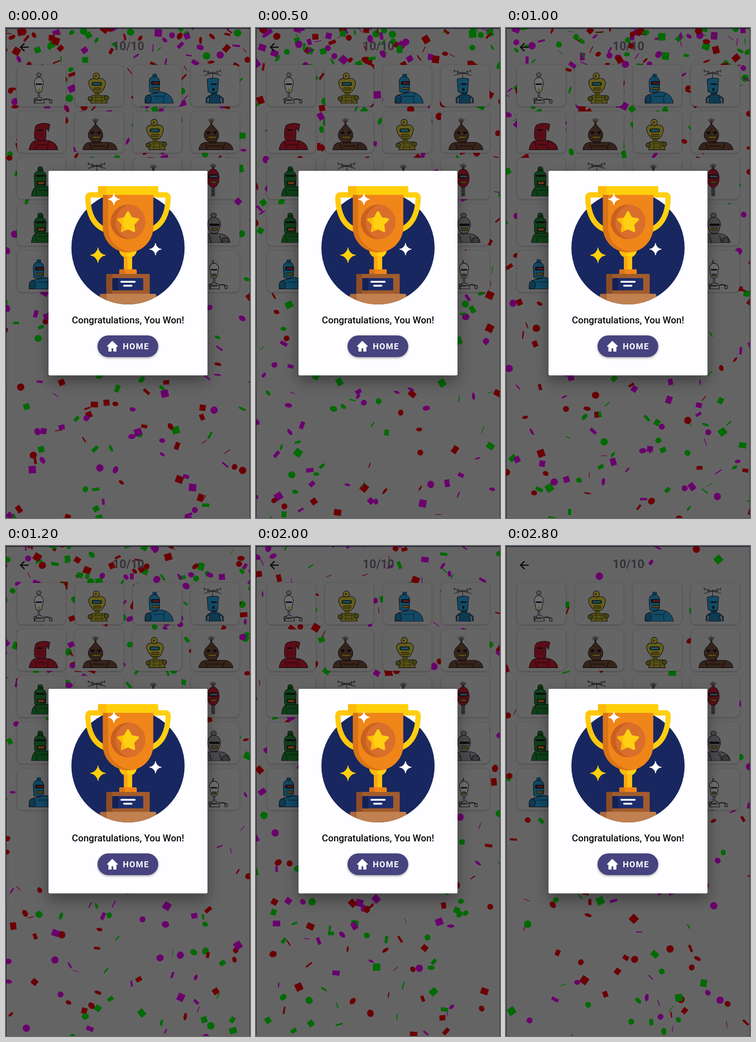
These frames come from a looping animation (528 by 1060 pixels, 2900 ms). An HTML page with a canvas:

```html
<!DOCTYPE html>
<html lang="en">
<head>
<meta charset="utf-8">
<title>Congratulations</title>
<style>
html, body { margin: 0; width: 100%; height: 100%; overflow: hidden; background: #656465; }
canvas, svg { position: absolute; left: 0; top: 0; width: 528px; height: 1060px; }
text { font-family: Roboto, "Open Sans", sans-serif; text-anchor: middle; }
</style>
</head>
<body>
<canvas id="stage" width="528" height="1060"></canvas>
<svg viewBox="0 0 528 1060">
  <text x="265" y="48" font-size="25.6" font-weight="700" fill="#353338">10/10</text>
  <text x="264" y="639" font-size="20.55" font-weight="500" fill="#0a0a0c">Congratulations, You Won!</text>
  <text x="281.5" y="695" font-size="18" font-weight="600" letter-spacing="1.6" fill="#fff">HOME</text>
</svg>
<script>
const W = 528, H = 1060, LOOP = 2900, STEP = 100;
const main = document.getElementById('stage').getContext('2d');
let c;

function layer(draw) {
  const cv = document.createElement('canvas');
  cv.width = W;
  cv.height = H;
  c = cv.getContext('2d');
  draw();
  return cv;
}

function rect(x, y, w, h, r, fill) {
  c.beginPath();
  c.roundRect(x, y, w, h, r);
  c.fillStyle = fill;
  c.fill();
}

function disc(x, y, rx, ry, fill, line) {
  c.beginPath();
  c.ellipse(x, y, rx, ry, 0, 0, 7);
  c.fillStyle = fill;
  c.fill();
  if (line) outline();
}

function outline(path) {
  c.strokeStyle = '#0d0d0f';
  c.lineWidth = 1.1;
  path ? c.stroke(path) : c.stroke();
}

function shape(d, fill, line) {
  const p = new Path2D(d);
  c.fillStyle = fill;
  c.fill(p);
  if (line) outline(p);
}

function stroke(d, color, width) {
  c.strokeStyle = color;
  c.lineWidth = width;
  c.stroke(new Path2D(d));
}

function shadow(color, blur, dy) {
  c.shadowColor = color;
  c.shadowBlur = blur;
  c.shadowOffsetY = dy;
}

// ---- robots, in card coordinates (105 x 89) ----
const INK = '#0d0d0f', GOLD = '#6b5714';

function grin(x, y, w = 13) {
  rect(x - w / 2, y - 3, w, 6, 2, INK);
  rect(x - w / 2 + 1, y - 2, w - 2, 4, 1, GOLD);
  for (let i = -1; i < 2; i++) rect(x + i * w / 4 - .4, y - 2, .8, 4, 0, INK);
}

function tuft(x, y) {
  for (let i = -2; i < 3; i++) stroke(`M${x} ${y}L${x + i * 3.4} ${y - 13 + Math.abs(i) * 1.5}`, '#2a2422', 1.5);
}

function antenna(x, y) {
  stroke(`M${x} ${y + 16}V${y - 3}M${x - 20} ${y - 5}L${x + 19} ${y + 6}M${x - 19} ${y + 6}L${x + 18} ${y - 5}
    M${x - 18} ${y - 7}v6M${x - 10} ${y - 5}v7M${x + 10} ${y - 5}v7M${x + 17} ${y - 7}v6M${x - 13} ${y + 1}h26`, '#19191c', 1.2);
}

function white(cone) {
  const col = '#6e6e71', dx = cone ? 3 : 0;
  c.translate(dx, 0);
  shape('M37 83Q38 70 48 70T59 83Z', '#626265', 1);
  disc(39, 75, 3, 3, '#4c4c4f', 1);
  disc(73, 79, 3, 4, '#5a5a5d', 1);
  stroke('M58 75Q67 72 72 76M38 79V83M43 76H54', INK, 2);
  rect(44, 58, 6, 13, 1, '#444447');
  if (cone) shape('M41 34L45 21L48 34Z', col, 1);
  else {
    rect(42, 24, 10, 6, 1, '#58585b');
    disc(47, 21, 5, 4, '#58585b', 1);
  }
  shape('M37 38Q38 28 47 27Q56 28 57 38L53 57Q47 62 41 57Z', col, 1);
  rect(40, 40, 14, 3, 1, INK);
  if (cone) grin(47, 53, 10);
  else rect(45, 51, 5, 6, 2, GOLD);
}

function yellow() {
  const col = '#645e1c', dim = '#484313';
  shape('M34 83L36 66H66L70 83Z', '#585218', 1);
  disc(33, 73, 5, 5, dim, 1);
  disc(68, 71, 5, 5, dim, 1);
  stroke('M41 70H61M42 77H62M45 66V83M58 66V83', '#33300c', 1.3);
  rect(42, 57, 12, 9, 1, dim);
  disc(46, 24, 7, 7, col, 1);
  disc(45, 24, 2, 2, '#4a1015');
  shape('M29 37Q33 26 47 31Q61 25 66 37Q66 49 57 59H41Q30 49 29 37Z', col, 1);
  rect(36, 37, 22, 8, 4, INK);
  rect(38, 38.5, 18, 5, 3, '#1a4c58');
  grin(48, 52, 17);
}

function blue() {
  const col = '#124a66', dim = '#0e3a52';
  shape('M26 83Q25 67 38 63L60 58Q85 62 87 83Z', col, 1);
  disc(33, 74, 7, 9, dim, 1);
  stroke('M44 68H67M69 62Q64 72 68 83', '#08283a', 1.6);
  rect(42, 19, 10, 8, 2, dim);
  shape('M35 37Q35 25 47 25Q57 26 58 37L57 56Q47 63 36 58Z', col, 1);
  rect(39, 35, 19, 8, 3, INK);
  rect(42, 37, 15, 4, 2, '#541720');
  grin(49, 51, 15);
}

function tall() {
  const col = '#124a66', dim = '#0e3a52';
  antenna(47, 17);
  shape('M38 83L41 65H61L65 83Z', dim, 1);
  stroke('M40 67L34 72V83M62 67L69 73V83', INK, 3.6);
  stroke('M40 67L34 72V83M62 67L69 73V83', dim, 2);
  rect(43, 59, 14, 7, 1, '#0b2e42');
  shape('M35 31Q47 26 60 30L58 58Q47 62 37 58Z', col, 1);
  rect(43, 40, 13, 3, 1, INK);
  rect(46, 50, 5, 6, 2, INK);
}

function red() {
  const col = '#5c0d17';
  shape('M26 83Q28 67 39 63H68Q86 68 88 83Z', col, 1);
  stroke('M38 66L43 83M68 65L65 83M44 72H64', '#2d060a', 1.6);
  shape('M38 59Q36 34 43 29Q57 23 71 28L68 43L63 35L62 61Q50 66 38 59Z', col, 1);
  rect(43, 39, 12, 3, 1, INK);
  stroke('M41 48H58M41 53H58', '#3f080e', 1.3);
}

function brown() {
  const col = '#36241b';
  shape('M17 83Q19 68 32 67H75Q89 70 91 83Z', col, 1);
  stroke('M32 70L36 83M73 70L68 83M38 75H66', '#1c100b', 2);
  rect(38, 62, 18, 7, 1, '#241610');
  tuft(44, 27);
  shape('M44 26Q49 33 57 41Q65 55 53 65Q44 69 35 64Q24 54 32 41Q40 33 44 26Z', col, 1);
  disc(38, 46, 4, 3, INK);
  disc(52, 46, 4, 3, INK);
  grin(46, 56, 18);
}

function green() {
  const col = '#0f4119';
  shape('M31 83Q33 66 42 62H66Q84 67 87 83Z', col, 1);
  stroke('M40 66L43 83M46 70H70', '#062a0d', 1.8);
  rect(44, 23, 13, 7, 2, '#0c3314');
  disc(50, 22, 5, 3, col, 1);
  shape('M37 40Q37 29 50 28Q62 29 63 40L62 61Q50 65 38 61Z', col, 1);
  rect(40, 37, 21, 4, 2, INK);
  rect(43, 50, 18, 9, 2, INK);
  rect(45, 52, 14, 5, 1, '#66340f');
  stroke('M49 52V57M54 52V57', GOLD, 1.5);
}

function ruby() {
  tuft(48, 25);
  rect(44, 59, 8, 24, 1, '#2f2f32');
  stroke('M44 65H52M44 70H52M44 75H52', '#4a4a4a', 1);
  disc(48, 44, 13, 20, '#5c0d17', 1);
  rect(38, 36, 20, 9, 4, INK);
  rect(41, 38.5, 16, 4, 2, '#36444e');
  grin(49, 53, 13);
}

function grey() {
  const col = '#4a4a4c';
  shape('M24 83Q26 68 40 64H66Q82 68 85 83Z', col, 1);
  disc(75, 78, 8, 6, '#3a3a3d', 1);
  stroke('M40 68L44 83M62 68L66 83', INK, 1.4);
  disc(49, 24, 6, 5, col, 1);
  shape('M36 46Q36 29 50 28Q64 30 64 46L59 61Q50 66 41 61Z', col, 1);
  rect(40, 42, 22, 5, 2, INK);
  grin(51, 54, 14);
}

const ROBOTS = [
  [white, yellow, blue, tall],
  [red, brown, yellow, brown],
  [green, tall, brown, ruby],
  [green, red, ruby, grey],
  [blue, grey, white, () => white(true)]
];

function drawCards() {
  ROBOTS.forEach((row, j) => row.forEach((robot, i) => {
    c.save();
    c.translate(24 + i * 125.4, 80 + j * 100.4);
    c.save();
    shadow('rgba(0,0,0,.28)', 4, 1);
    rect(0, 0, 105, 89.5, 11, '#666566');
    c.restore();
    c.beginPath();
    c.rect(0, 0, 105, 83.5);
    c.clip();
    robot();
    c.restore();
  }));
}

// ---- dialog ----
function star(x, y, R, r, n) {
  let d = '';
  for (let i = 0; i < 2 * n; i++) {
    const a = i * Math.PI / n - Math.PI / 2, q = i % 2 ? r : R;
    d += `${i ? 'L' : 'M'}${x + q * Math.cos(a)} ${y + q * Math.sin(a)}`;
  }
  return d + 'Z';
}

function sparkle(x, y, r, fill) {
  const k = r * .2;
  shape(`M${x} ${y - r}Q${x + k} ${y - k} ${x + r} ${y}Q${x + k} ${y + k} ${x} ${y + r}
    Q${x - k} ${y + k} ${x - r} ${y}Q${x - k} ${y - k} ${x} ${y - r}Z`, fill);
  stroke(`M${x} ${y - r + 1}V${y + r - 1}M${x - r + 1} ${y}H${x + r - 1}`, fill, 2);
}

function drawTrophy() {
  const NAVY = '#18275f', ORANGE = '#f08519', DARK = '#d97318', YELLOW = '#ffd012', AMBER = '#fdb90b';
  disc(264, 475.5, 122.5, 122.5, NAVY);

  stroke('M212 361H183Q177 361 177.1 368C178 402 190 427 214 436', '#ffc80d', 11.5);
  stroke('M316 361H345Q351 361 350.9 368C350 402 338 427 314 436', YELLOW, 11.5);

  rect(245, 470, 38, 27, [0, 0, 17, 17], YELLOW);
  rect(245, 470, 17, 27, [0, 0, 0, 17], AMBER);
  rect(255, 494, 18, 30, 0, '#ffc20e');
  rect(255, 494, 8, 30, 0, '#f9a514');
  rect(245, 522, 38, 12, [3, 3, 0, 0], ORANGE);
  rect(245, 522, 12, 12, [3, 0, 0, 0], DARK);

  const cup = 'M209.5 358H318.5V431A54.5 54.5 0 0 1 209.5 431Z';
  shape(cup, DARK);
  c.save();
  c.clip(new Path2D(cup));
  shape('M221 358H330V431A54.5 54.5 0 0 1 275.5 485.5Q221 476 221 431Z', ORANGE);
  c.restore();
  rect(199, 342, 130.5, 19, 3, '#ffcf0a');
  rect(199, 342, 18, 19, [3, 0, 0, 3], '#fdbb0b');

  c.save();
  c.beginPath();
  c.arc(264, 419.5, 37.5, 0, 7);
  c.clip();
  disc(264, 419.5, 38, 38, '#c8601f');
  disc(275, 419.5, 38, 38, '#d96f2b');
  c.restore();
  const s = star(264, 421, 22, 11.5, 5);
  shape(s, AMBER);
  stroke(s, AMBER, 5);
  c.save();
  c.beginPath();
  c.arc(284, 419, 31, 0, 7);
  c.clip();
  shape(s, YELLOW);
  stroke(s, YELLOW, 5);
  c.restore();

  rect(217, 532, 94, 45, [2, 2, 0, 0], '#a15b2d');
  rect(217, 532, 13, 45, [2, 0, 0, 0], '#8c4c27');
  rect(230, 541, 67, 26.5, 2, '#1d2d6b');
  rect(230, 541, 13, 26.5, [2, 0, 0, 2], '#142153');
  stroke('M249.5 549H278.5M255.5 557.5H271.5', '#fff', 4);
  c.save();
  c.beginPath();
  c.arc(264, 475.5, 122.5, 0, 7);
  c.clip();
  rect(203.5, 575, 121.5, 26, [3, 3, 0, 0], '#c0804f');
  rect(203.5, 575, 14, 26, [3, 0, 0, 0], '#a9693e');
  c.restore();

  sparkle(233.5, 370.5, 12.5, '#fff');
  sparkle(323.5, 478.5, 13, '#fff');
  sparkle(199, 491.5, 16.5, '#ffd00d');
}

function drawDialog() {
  c.lineCap = c.lineJoin = 'round';
  c.save();
  shadow('rgba(0,0,0,.36)', 30, 13);
  rect(92, 309, 344, 442.5, 3, '#fefdff');
  c.restore();
  drawTrophy();
  c.save();
  shadow('rgba(0,0,0,.34)', 5, 2);
  rect(198, 665, 131.5, 47, 23.5, '#46437f');
  c.restore();
  const house = 'M230 678L241 688.5H238V699H233V692H227.5V699H222.5V688.5H219.5Z';
  shape(house, '#fff');
  stroke(house, '#fff', 1.8);
}

function drawBack() {
  rect(0, 0, W, H, 0, '#656465');
  rect(0, 647, 4, 138, [0, 3, 3, 0], '#4f4e4f');
  rect(0, 648, 3, 136, [0, 2, 2, 0], '#706f70');
}

function drawFront() {
  drawCards();
  c.lineCap = 'butt';
  stroke('M49 41.5H32M40 33L31.5 41.5L40 50', '#0b0b0d', 2.6);
  rect(0, 0, W, 1.6, 0, '#10142f');
  rect(0, 0, 1, H, 0, '#1a1a1c');
  rect(W - 1, 0, 1, H, 0, '#3a393b');
  drawDialog();
}

// ---- confetti ----
function rng(seed) {
  return () => {
    seed = seed + 0x6D2B79F5 | 0;
    let t = Math.imul(seed ^ seed >>> 15, 1 | seed);
    t = t + Math.imul(t ^ t >>> 7, 61 | t) ^ t;
    return ((t ^ t >>> 14) >>> 0) / 4294967296;
  };
}

const rand = rng(20), span = (a, b) => a + rand() * (b - a);
const COLORS = ['#6a006c', '#006a04', '#6a0003'];
const FIRST = -4, FADE = .5, LAST = 2, RATE = 280;

// The stream is steady, then thins out between FADE and LAST.
const bits = Array.from({ length: (LAST - FIRST) * RATE }, (_, i) => {
  const a = span(0, 2 * Math.PI), v = span(50, 300);
  return {
    born: FIRST + i / RATE,
    x: span(-50, W + 50),
    vx: v * Math.cos(a) * .6,
    vy: v * Math.sin(a),
    g: span(350, 410),
    size: rand() < .5 ? 13 : 16,
    round: rand() < .45,
    color: COLORS[Math.floor(rand() * 3)],
    turn: span(0, 6.28), spin: span(-3.5, 3.5),
    tilt: span(0, 6.28), flip: span(3, 8)
  };
}).filter(b => rand() > (b.born - FADE) / (LAST - FADE));

function drawConfetti(t) {
  for (const b of bits) {
    const u = t - b.born;
    if (u < 0) continue;
    const x = b.x + b.vx * u, y = -25 + b.vy * u + b.g * u * u / 2;
    if (y < -20 || y > H + 20 || x < -20 || x > W + 20) continue;
    const h = b.size / 2, w = h * Math.max(.1, Math.abs(Math.cos(b.tilt + b.flip * u)));
    main.save();
    main.translate(x, y);
    main.rotate(b.turn + b.spin * u);
    main.fillStyle = b.color;
    main.beginPath();
    if (b.round) main.ellipse(0, 0, w, h, 0, 0, 7);
    else main.rect(-w, -h, 2 * w, 2 * h);
    main.fill();
    main.restore();
  }
}

const back = layer(drawBack), front = layer(drawFront);
const start = performance.now();
let shown = -1;

function tick() {
  const ms = (performance.now() - start) % LOOP;
  const step = Math.floor(ms / STEP);
  if (step !== shown) {
    shown = step;
    main.drawImage(back, 0, 0);
    drawConfetti(step * STEP / 1000);
    main.drawImage(front, 0, 0);
  }
  requestAnimationFrame(tick);
}
tick();
</script>
</body>
</html>
```
